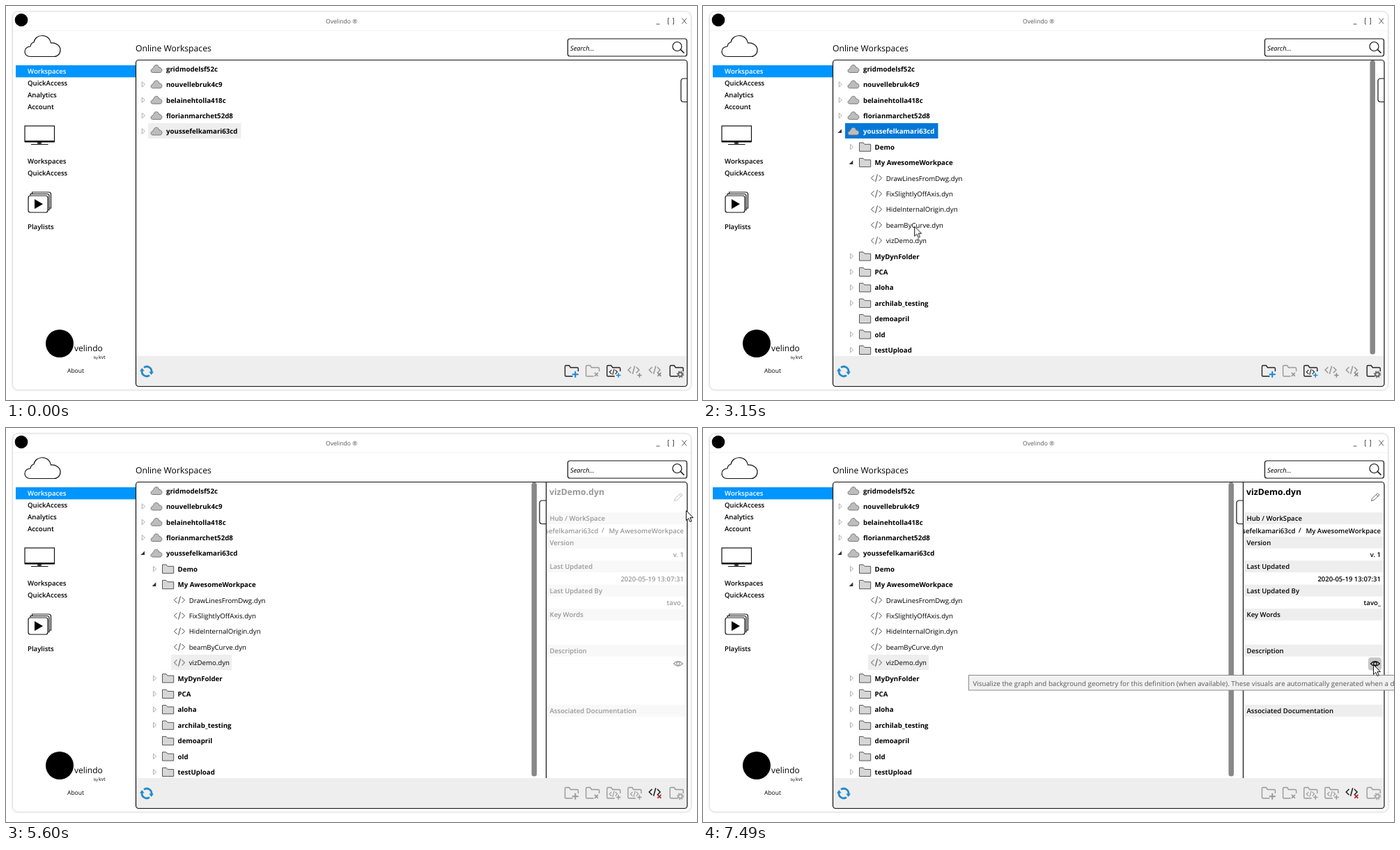
These frames come from a looping animation (992 px wide and 565 px high, 8 s). An HTML page:

```html
<!DOCTYPE html>
<html lang="en">
<head>
<meta charset="utf-8">
<title>Online Workspaces</title>
<style>
html, body { margin: 0; height: 100%; overflow: hidden; background: #fff; }
svg { display: block; width: 100vw; height: 100vh; }
text { font: 9.67px "Open Sans", "Noto Sans", sans-serif; fill: #000; text-rendering: geometricPrecision; white-space: pre; }
.semi { font-weight: 600; font-size: 9.6px; }
.bold { font-weight: 700; font-size: 9.7px; }
.end { text-anchor: end; }
.line { fill: none; stroke: #111; stroke-width: 1.2; }
.bar { fill: #eee; }
.dark { color: #222; }
.dim { color: #999; }

/* state switches */
.hub-bg, .hub-text, .file-bg, .file-text, .file-icon, .closed, .opened,
.tools-a, .tools-b, .dock, .panel, .fade, .hover, .tip { animation: 8s step-end infinite; }
.hub-bg { animation-name: hub-bg; }
.hub-text { animation-name: hub-text; }
.file-bg { animation-name: file-bg; }
.file-text { animation-name: file-text; }
.file-icon { animation-name: file-icon; }
.closed { animation-name: closed; }
.opened { animation-name: opened; }
.tools-a { animation-name: tools-a; }
.tools-b { animation-name: tools-b; }
.dock { animation-name: dock; }
.panel { animation-name: panel; }
.fade { animation-name: fade; }
.hover { animation-name: hover; }
.tip { animation-name: tip; }
@keyframes hub-bg { 0% { fill: #eee; } 19.75% { fill: #0078d7; } 47.375%, to { fill: #fff; } }
@keyframes hub-text { 0% { fill: #000; } 19.75% { fill: #fff; } 47.375%, to { fill: #000; } }
@keyframes file-bg { 0% { fill: #fff; } 47.375% { fill: #0078d7; } 66%, to { fill: #eee; } }
@keyframes file-text { 0% { fill: #000; } 47.375% { fill: #fff; } 66%, to { fill: #000; } }
@keyframes file-icon { 0% { opacity: 1; } 47.375% { opacity: .14; } 66%, to { opacity: 1; } }
@keyframes closed { 0% { visibility: visible; } 20.875%, to { visibility: hidden; } }
@keyframes opened { 0% { visibility: hidden; } 20.875%, to { visibility: visible; } }
@keyframes tools-a { 0% { visibility: visible; } 47.375%, to { visibility: hidden; } }
@keyframes tools-b { 0% { visibility: hidden; } 47.375%, to { visibility: visible; } }
@keyframes dock { 0% { transform: none; } 70%, to { transform: translateX(-203px); } }
@keyframes panel { 0% { visibility: hidden; } 70%, to { visibility: visible; } }
@keyframes fade { 0% { opacity: 0; } 70% { opacity: .4; } 71% { opacity: .75; } 72%, to { opacity: 1; } }
@keyframes hover { 0% { visibility: hidden; } 86.75%, to { visibility: visible; } }
@keyframes tip { 0% { opacity: 0; } 91.625% { opacity: .35; } 92.625% { opacity: .7; } 93.625%, to { opacity: 1; } }

.cursor { animation: cursor 8s ease-in-out infinite; }
@keyframes cursor {
  0%, 3.62% { transform: translate(854px, 528px); opacity: 0; }
  3.625% { transform: translate(854px, 528px); opacity: 1; }
  13.625% { transform: translate(217px, 185px); }
  14.75%, 15.5% { transform: translate(215px, 184px); }
  19.75%, 24.375% { transform: translate(193px, 176.5px); animation-timing-function: ease-in; }
  29.375% { transform: translate(247px, 233px); animation-timing-function: ease-out; }
  35.375% { transform: translate(294px, 288px); }
  40.375% { transform: translate(304px, 318px); }
  44.375%, 54.125% { transform: translate(299px, 338px); }
  60.125% { transform: translate(958px, 107px); }
  62.125% { transform: translate(970px, 124px); }
  64.125%, 73.875% { transform: translate(976px, 118px); }
  84.75% { transform: translate(969px, 320px); }
  87.75%, to { transform: translate(962px, 339px); opacity: 1; }
}
</style>
</head>
<body>
<svg viewBox="0 0 992 565" preserveAspectRatio="none">
  <defs>
    <path id="cloud" vector-effect="non-scaling-stroke" d="M35 72.5C29.5 72.5 27 69 27 65.5C27 61 30.5 58.5 35 58C35.5 54.5 37.5 52.5 40 52C41 46 46 42.5 52 42.5C59 42.5 63.5 47 64.5 53C71 52.5 78 56 78 63C78 69 73.5 72.5 69 72.5Z"/>
    <path id="code" d="M4.5-4L.5 0L4.5 4M11.5-4L15.5 0L11.5 4M9.5-5.5L6.5 5.5" fill="none" stroke="currentColor"/>
    <path id="folder" d="M.5-6H6L8-3.7H16.7V6.3H.5Z" fill="#d6d6d6" stroke="#555" stroke-linejoin="round"/>
    <path id="closed" d="M-2-3.7L2 0L-2 3.7Z" fill="#fff" stroke="#aaa"/>
    <path id="opened" d="M2.5-3.2V2.5H-3.2Z" fill="#333"/>
    <path id="outline" d="M1.5 7H-8Q-9.5 7-9.5 5.5V-7Q-9.5-8.5-8-8.5H-3.5L-1.5-5.5H8Q9.5-5.5 9.5-4V0" fill="none" stroke="currentColor" stroke-width="1.4"/>
    <path id="plus" d="M0-4.5V4.5M-4.5 0H4.5" fill="none" stroke="currentColor" stroke-width="2"/>
    <path id="cross" d="M-2.5-2.5L2.5 2.5M2.5-2.5L-2.5 2.5" fill="none" stroke="currentColor" stroke-width="1.7"/>
    <g id="gear" fill="none" stroke="currentColor">
      <circle r="2.8" stroke-width="2"/>
      <circle r="4.3" stroke-width="1.6" stroke-dasharray="1.69"/>
    </g>
    <clipPath id="side"><path d="M776 78H977V502H776Z"/></clipPath>
  </defs>

  <!-- window -->
  <rect x="8.5" y="7.5" width="976" height="544" rx="9" fill="none" stroke="#f3f3f3" stroke-width="2"/>
  <rect x="9.5" y="8" width="974" height="542.5" rx="8" fill="#fff" stroke="#e0e0e0"/>
  <path d="M10 35.5H983" stroke="#f4f4f4"/>
  <circle cx="22" cy="20" r="9.3"/>
  <text x="459" y="24.7" style="font-size:8.6px;fill:#555">Ovelindo ®</text>
  <path d="M933.5 26H938.5M952 17.5H950.5V26H952M957 17.5H958.5V26H957M970.5 17.5L977 25.5M977 17.5L970.5 25.5" fill="none" stroke="#555"/>

  <!-- sidebar -->
  <use href="#cloud" class="line"/>
  <rect x="14" y="85" width="172" height="17.3" fill="#0095ff"/>
  <g id="nav"></g>
  <rect x="27" y="172" width="42.5" height="22.5" class="line"/>
  <path d="M27 194.3H69.5" stroke="#111" stroke-width="2.4"/>
  <path d="M48 195V198M36 198.5H60.5" class="line"/>
  <path d="M45 196.5H51" stroke="#111" stroke-width="2"/>
  <path d="M35 271.5V269.5H59Q62 269.5 62 272.5V292.5H60.5M37.5 269.5V267H61.5Q64.5 267 64.5 270V290H62" class="line"/>
  <rect x="32" y="272" width="28" height="24" rx="3" class="line"/>
  <path d="M41 277V291L53 284Z"/>
  <circle cx="77" cy="484" r="20"/>
  <text x="98" y="495" style="font-size:12px">velindo</text>
  <text x="126" y="506" style="font-size:5.5px">by</text>
  <text x="133" y="506" style="font-size:7px">kvt</text>
  <text x="88" y="526.2" style="font-size:8.5px">About</text>

  <!-- heading and search -->
  <text x="186" y="64.5" style="font-size:12.18px">Online Workspaces</text>
  <rect x="806.5" y="47" width="171" height="25" rx="3" class="line"/>
  <text x="810" y="63.5" style="font-size:9.3px;font-style:italic">Search...</text>
  <circle cx="963.5" cy="58" r="6.5" class="line"/>
  <path d="M968.5 62.5L973.5 67.5" class="line" style="stroke-width:1.6"/>

  <!-- tree -->
  <path d="M187 502H977.5V545H187Z" class="bar"/>
  <rect class="hub-bg" x="204" y="168" width="133.5" height="22"/>
  <g id="hubs"></g>
  <g class="opened">
    <rect class="file-bg" x="237" y="325" width="87" height="22"/>
    <g id="files"></g>
  </g>
  <g class="dock">
    <rect class="opened" x="957.5" y="78" width="7.5" height="421.5" rx="3.5" fill="#888"/>
    <path d="M978 104H973Q969 104 969 108V133.5Q969 137.5 973 137.5H978" class="line"/>
  </g>

  <!-- toolbar -->
  <g fill="none" stroke="#2389cd" stroke-width="2.8">
    <path d="M198 518.3A7 7 0 0 1 208.9 525"/>
    <path d="M206 529.7A7 7 0 0 1 195.1 523"/>
  </g>
  <path d="M205.3 524.5H212L208.7 529ZM198.7 523.5H192L195.3 519Z" fill="#2389cd"/>
  <g id="tools"></g>

  <!-- details -->
  <g class="panel">
    <path d="M775 78H977V502H775Z" fill="#fff"/>
    <path d="M775.5 78V502" class="line"/>
    <g class="fade" clip-path="url(#side)">
      <text x="780" y="95.5" class="bold" style="font-size:12.27px">vizDemo.dyn</text>
      <path d="M959.5 104.5L960.5 101L968.5 93.5L971 96L963 103.5ZM966.5 95.3L969 98" fill="none" stroke="#666"/>
      <g id="fields"></g>
      <rect class="hover" x="955" y="329" width="19" height="18.5" rx="4" fill="#c8c8c8"/>
      <path d="M958.5 338Q965 331.5 971.5 338Q965 344.5 958.5 338Z" class="line"/>
      <circle cx="965" cy="338" r="2.3" class="line"/>
    </g>
  </g>
  <rect x="186.5" y="77.5" width="791.5" height="468" rx="4" class="line"/>

  <g class="tip">
    <rect x="381.5" y="354.5" width="620" height="21.5" fill="#f1f1f1" stroke="#8a8a8a"/>
    <text x="387.5" y="369.5" style="font-size:9.77px;fill:#575757">Visualize the graph and background geometry for this definition (when available). These visuals are automatically generated when a d</text>
  </g>

  <path class="cursor" d="M.5.5V14.5L3.8 11.4L6 16.5L8.3 15.5L6.1 10.6H10.5Z" fill="#fff" stroke="#111" stroke-linejoin="round"/>
</svg>

<script>
const fill = (id, parts) => { document.getElementById(id).innerHTML = parts.join(''); };
const text = (x, y, str, cls = '', style = '') => `<text x="${x}" y="${y}" class="${cls}" style="${style}">${str}</text>`;
const use = (id, x, y, cls = '', scale = 1) =>
  `<g transform="translate(${x} ${y}) scale(${scale})"><use href="#${id}" class="${cls}"/></g>`;
const rowY = i => 90 + i * 22.4;

fill('nav', [
  ['Workspaces', 96.6, 'fill:#fff'], ['QuickAccess', 113.8], ['Analytics', 131], ['Account', 148.2],
  ['Workspaces', 225.6], ['QuickAccess', 242.8], ['Playlists', 320.2]
].map(([name, y, style]) => text(31, y, name, 'semi', style)));

const smallCloud = y =>
  `<g transform="translate(199.7 ${y - 20.7}) scale(.31 .36)"><use href="#cloud" fill="#bdbdbd" stroke="#777"/></g>`;

const hubs = ['gridmodelsf52c', 'nouvellebruk4c9', 'belainehtolla418c', 'florianmarchet52d8', 'youssefelkamari63cd'];
fill('hubs', hubs.map((name, i) => {
  const y = rowY(i), last = i === 4;
  return (i ? use('closed', 197.3, y, last ? 'closed' : '') : '') +
    (last ? use('opened', 196.5, y, 'opened') : '') +
    smallCloud(y) + text(230, y + 3.7, name, last ? 'bold hub-text' : 'bold');
}));

// names ending in .dyn are files; '-' marks an empty folder, '+' an open one
const files = ['Demo', '+My AwesomeWorkpace', 'DrawLinesFromDwg.dyn', 'FixSlightlyOffAxis.dyn',
  'HideInternalOrigin.dyn', 'beamByCurve.dyn', 'vizDemo.dyn', 'MyDynFolder', 'PCA', 'aloha',
  'archilab_testing', '-demoapril', 'old', 'testUpload'];
fill('files', files.map((entry, i) => {
  const y = rowY(i + 5), name = entry.replace(/^[+-]/, '');
  if (name.endsWith('.dyn')) {
    const picked = name === 'vizDemo.dyn';
    return `<g color="#444">${use('code', 241, y, picked ? 'file-icon' : '')}</g>` +
      text(262.7, y + 3.7, name, picked ? 'file-text' : '');
  }
  const arrow = entry[0] === '-' ? '' :
    entry[0] === '+' ? use('opened', 212.8, y) : use('closed', 213.6, y);
  return arrow + use('folder', 224, y) + text(246.5, y + 3.7, name, 'bold');
}));

// toolbar: [base, badge, badge colour, tone]
const tool = ([base, badge, color, tone], i) => {
  const x = 812 + i * 30.15, y = 524;
  const shape = {
    outline: use('outline', x, y),
    both: use('outline', x, y) + use('code', x - 6.3, y + .8, '', .75),
    code: use('code', x - 9.8, y - 2, '', 1.05)
  }[base];
  const small = badge === 'plus' && base !== 'outline';
  const mark = small ? use(badge, x + 7, y + 5.5, '', .7) : use(badge, x + 5.3, y + 4.3);
  return `<g class="${tone}" stroke-width="1.5">${shape}</g><g color="${color}">${mark}</g>`;
};
const blue = '#1188dd', grey = '#999';
const idle = [['outline', 'plus', blue, 'dark'], ['outline', 'cross', grey, 'dim'], ['both', 'plus', blue, 'dark'],
  ['code', 'plus', '#888', 'dim'], ['code', 'cross', '#888', 'dim'], ['outline', 'gear', '#666', 'dark']];
const active = [['outline', 'plus', grey, 'dim'], ['outline', 'cross', grey, 'dim'], ['both', 'plus', grey, 'dim'],
  ['both', 'plus', grey, 'dim'], ['code', 'cross', '#b3262e', 'dark'], ['outline', 'gear', '#aaa', 'dim']];
fill('tools', [
  `<g class="tools-a">${idle.map(tool).join('')}</g>`,
  `<g class="tools-b">${active.map(tool).join('')}</g>`
]);

const fields = [['Hub / WorkSpace', 121], ['Version', 155.6, 'v. 1'], ['Last Updated', 190.1, '2020-05-19 13:07:31'],
  ['Last Updated By', 224.6, 'tavo_'], ['Key Words', 259.1], ['Description', 310.7], ['Associated Documentation', 396.8]];
fill('fields', fields.map(([label, y, value]) =>
  `<rect x="777" y="${y}" width="199.5" height="17" class="bar"/>` + text(780.5, y + 12.2, label, 'semi') +
  (value ? text(973, y + 29.6, value, 'semi end') : '')
).concat(
  text(850.5, 150.6, hubs[4], 'semi end'), text(855, 149.6, '/', 'semi'),
  text(973, 150.6, 'My AwesomeWorkpace', 'semi end')
));
</script>
</body>
</html>
```
